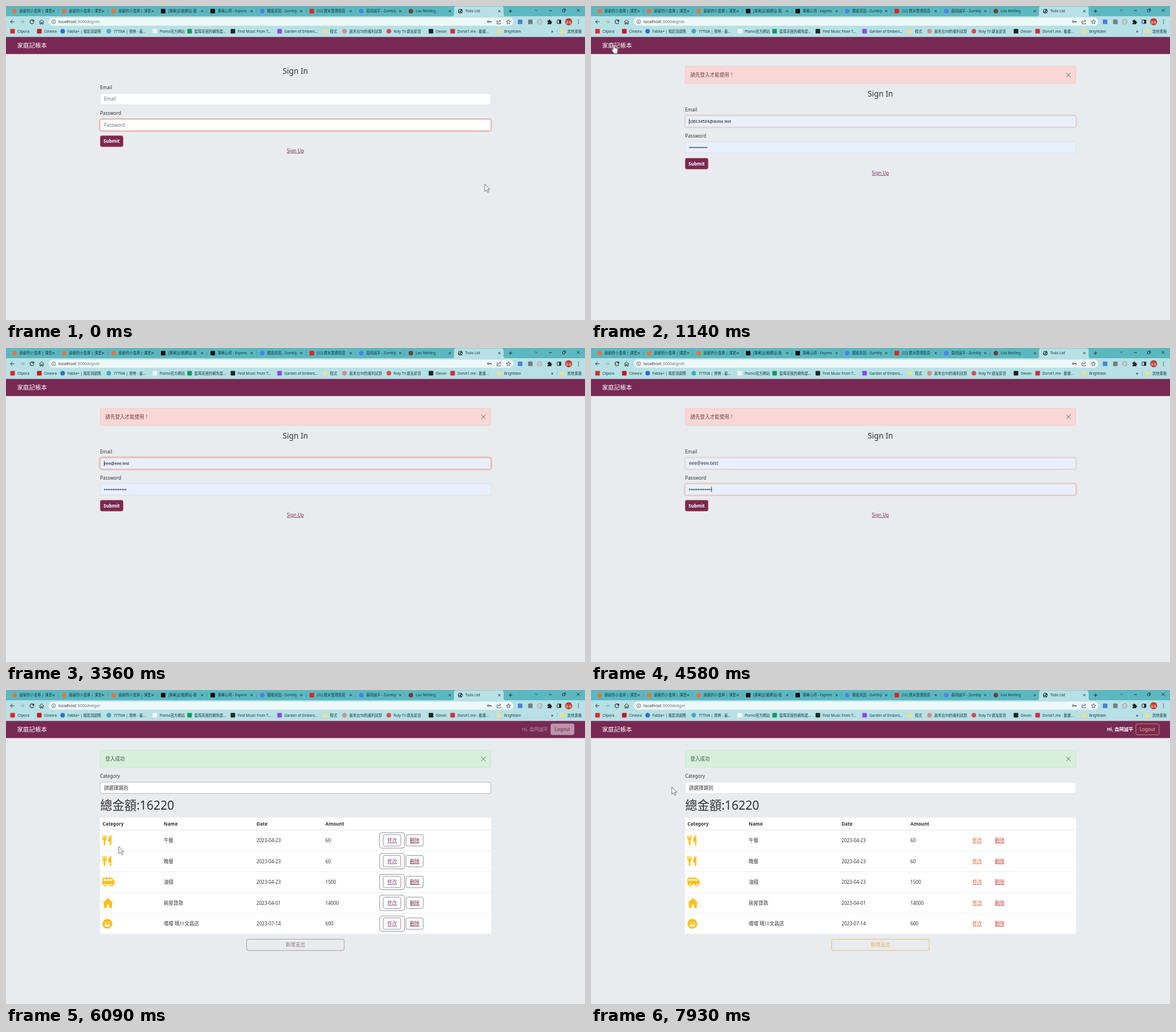
An HTML page for the animation above (8000 ms loop, 1017x551 px).

```html
<!DOCTYPE html>
<html lang="zh-Hant">
<head>
<meta charset="utf-8">
<title>Todo List</title>
<style>
html, body { margin: 0; width: 100%; height: 100%; overflow: hidden; background: #e9ecef; }
svg { display: block; width: 100vw; height: 100vh; }
text { font: 8.2px "Noto Sans", "Noto Sans CJK TC", "Noto Sans CJK JP", "Noto Sans CJK", sans-serif; fill: #333; white-space: pre; }
.ui { font-size: 6.3px; fill: #17393c; }
.url { font-size: 7.45px; }
.cjk { font-size: 8.55px; }
.brand { font-size: 10.5px; fill: #fff; }
.h3 { font-size: 13.65px; }
.h1 { font-size: 21.2px; }
.bold { font-weight: 700; }
.hint { fill: #6c757d; }
.auto { font: 7.1px "Liberation Sans", Arial, sans-serif; fill: #111; }
.mid { text-anchor: middle; }
.end { text-anchor: end; }
.link { text-decoration: underline; }
.line { fill: none; stroke: #222; stroke-width: .9; }
.dots { stroke: #222; stroke-linecap: round; }

.shift { animation: shift 8s step-end infinite; }
@keyframes shift { 0% { transform: none } 14.19%, 100% { transform: translateY(39.3px) } }

.glow-email { animation: glowEmail 8s linear infinite; }
@keyframes glowEmail {
  0%, 14.18% { opacity: 0 } 14.19%, 15.1% { opacity: .5 } 16.1%, 56.2% { opacity: 1 }
  57.2%, 58% { opacity: .35 } 59.2%, 100% { opacity: 0 }
}
.glow-pass { animation: glowPass 8s linear infinite; }
@keyframes glowPass {
  0%, 14.18% { opacity: 1 } 14.19%, 56.2% { opacity: 0 } 57.2%, 58% { opacity: .65 }
  59.2%, 71.3% { opacity: 1 } 73.2%, 100% { opacity: 0 }
}
.caret { animation: caret 8s step-end infinite; }
@keyframes caret {
  0% { transform: translate(172px, 158.5px); opacity: 0 }
  14.19% { transform: translate(172px, 158.5px); opacity: 1 }
  30% { transform: translate(261.3px, 158.5px) }
  32% { transform: translate(246.3px, 158.5px) }
  34% { transform: translate(172px, 158.5px) }
  37% { transform: translate(176.8px, 158.5px) }
  40% { transform: translate(181.4px, 158.5px) }
  42% { transform: translate(172px, 158.5px) }
  52.37% { transform: translate(224.3px, 158.5px) }
  56.2% { transform: translate(211.3px, 204px) }
  62.25% { transform: translate(175.2px, 204px) }
  64.37% { transform: translate(178.3px, 204px) }
  65.25% { transform: translate(181.4px, 204px); opacity: 1 }
  71.37%, 100% { transform: translate(181.4px, 204px); opacity: 0 }
}
.spin { transform-box: fill-box; transform-origin: 50% 50%; animation: spin 1s linear infinite; }
@keyframes spin { to { transform: rotate(360deg) } }

.cursor { animation: move 8s ease-in-out infinite; }
@keyframes move {
  0%, 1.37% { transform: translate(841px, 312.5px) }
  2.1%, 6.2% { transform: translate(842px, 337px) }
  12.6%, 19.1% { transform: translate(40.2px, 67.5px) }
  24.9% { transform: translate(451px, 228px) }
  27%, 66% { transform: translate(440px, 206px) }
  66.1%, 67.4% { transform: translate(205px, 274.5px) }
  69.25%, 77.2% { transform: translate(198px, 274.5px); animation-timing-function: ease-in }
  81.3% { transform: translate(370px, 262px); animation-timing-function: linear }
  87.5% { transform: translate(700px, 130px); animation-timing-function: ease-out }
  92.1%, 93% { transform: translate(891px, 70px); animation-timing-function: ease-in }
  96% { transform: translate(420px, 195px); animation-timing-function: ease-out }
  98% { transform: translate(124px, 228px) }
  99.1%, 100% { transform: translate(142px, 170px) }
}

/* Control colours settling after the ledger loads */
.box { animation: box 8s linear infinite; }
@keyframes box { 0%, 77.2% { stroke: #77757c } 78.2%, 100% { stroke: transparent } }
.edit { animation: edit 8s linear infinite; }
@keyframes edit { 0%, 77.2% { fill: #94617f } 78.2%, 100% { fill: #d97a52 } }
.del { animation: del 8s linear infinite; }
@keyframes del { 0%, 77.2% { fill: #6d3049 } 78.2%, 100% { fill: #c8443f } }
.add { animation: add 8s linear infinite; }
@keyframes add { 0%, 77.2% { fill: #8d7377 } 78.2%, 100% { fill: #e6b04a } }
.add-box { animation: addBox 8s linear infinite; }
@keyframes addBox { 0%, 77.2% { stroke: #a4827c } 78.2%, 100% { stroke: #e6b04a } }
.pick { animation: pick 8s linear infinite; }
@keyframes pick { 0%, 77.2% { stroke: #8f9194 } 78.2%, 100% { stroke: #d5d9de } }
.hi { animation: hi 8s linear infinite; }
@keyframes hi { 0%, 77.2% { fill: #a0708a } 78.2%, 100% { fill: #fff } }
.out-box { animation: outBox 8s linear infinite; }
@keyframes outBox {
  0%, 77.2% { fill: #bb94a9; stroke: #c3a0b0 } 78.2%, 100% { fill: #772953; stroke: #e5a560 }
}
.out { animation: out 8s linear infinite; }
@keyframes out { 0%, 77.2% { fill: #6a2d4e } 78.2%, 100% { fill: #f0c27c } }
</style>
</head>
<body>
<svg id="stage" viewBox="0 0 1017 551" preserveAspectRatio="none"></svg>
<script>
const LOAD = 1135, LEDGER = 6085, END = 8000;
const rules = [];

// Shows markup only between two times (ms) of the loop.
function on(from, to, markup) {
  const name = 'on' + rules.length, pc = ms => ms / END * 100 + '%';
  rules.push(`@keyframes ${name}{0%{opacity:0}${pc(from)}{opacity:1}${pc(to)}{opacity:0}100%{opacity:0}}`);
  return `<g style="animation:${name} 8s step-end infinite">${markup}</g>`;
}
const text = (x, y, s, cls = '') => `<text x="${x}" y="${y}" class="${cls}">${s}</text>`;
const rect = (x, y, w, h, fill, r = 0, more = '') =>
  `<rect x="${x}" y="${y}" width="${w}" height="${h}" rx="${r}" fill="${fill}" ${more}/>`;
const disc = (x, y, r, fill, more = '') => `<circle cx="${x}" cy="${y}" r="${r}" fill="${fill}" ${more}/>`;
const line = (d, more = '') => `<path class="line" d="${d}" ${more}/>`;
const shape = (d, fill, more = '') => `<path d="${d}" fill="${fill}" ${more}/>`;
const cross = (x, y, r, more) => line(`M${x - r} ${y - r}l${2 * r} ${2 * r}m0 ${-2 * r}l${-2 * r} ${2 * r}`, more);
const square = (x, y, c) => rect(x - 4, y - 4, 8, 8, c, 1);
const dot = (x, y, c) => disc(x, y, 4, c);
const folder = (x, y) => shape(`M${x - 3.5} ${y - 3.5}h3l1 1h3v6.3h-7z`, '#f9dc86');

function tabs() {
  const list = [
    ['爺爺的小金庫 | 課業', dot, '#f0713a'], ['爺爺的小金庫 | 課業', dot, '#f0713a'],
    ['爺爺的小金庫 | 課業', dot, '#f0713a'], ['[專案]記帳網站-我', square, '#111'],
    ['專案心得 - Expens', square, '#111'], ['腰痠原因 - Zumbly', dot, '#4b83ea'],
    ['(32) 週末整理廚房', square, '#e5241f'], ['森岡誠平 - Zumbly', dot, '#4b83ea'],
    ['Lou Meiting', dot, '#70403a'], ['Todo List']
  ];
  return list.map(([title, mark, color], i) => {
    const x = 4.5 + 87 * i;
    return (i < 9 ? mark(x + 10.6, 9, color) : '') +
      text(x + 19.2, 11.4, title, 'ui') + cross(x + 79, 9, 1.9) +
      (i < 8 ? rect(x + 87.2, 5, .6, 8, '#3c8d95') : '');
  }).join('');
}

function bookmarks() {
  return [
    [20, 'Clipora', square, '#e5241f'], [67, 'Cinevra', square, '#c9161d'],
    [108, 'Fablia+ | 電影與劇集', dot, '#2b6fd0'], [189, '77TIVA | 樂映 - 最...', dot, '#42a9c4'],
    [270, 'Plomo官方網站', square, '#f3f3f5'], [331, '藍莓茶館的轉角建...', square, '#159a5b'],
    [407, 'Find Music From T...', square, '#20282a'], [489, 'Garden of Embers...', square, '#8d4be0'],
    [569, '程式', folder], [603, '晨禾台50的複利試算', dot, '#d58c86'],
    [681, 'Roly TV 劇友影音', dot, '#e2483d'], [755, 'Devon', square, '#222'],
    [793, 'Dorvil1.me - 動畫...', square, '#d9283c'], [875, 'Brightden', folder], [986, '其他書籤', folder]
  ].map(([x, label, mark, color]) => mark(x - 8.5, 44.3, color) + text(x, 47, label, 'ui')).join('') +
    text(957.5, 47, '»', 'ui bold') + rect(968, 40, .6, 9, '#6fb3b8');
}

function globe(x, y) {
  return disc(x, y, 4, '#2c3638') +
    shape(`M${x - 3} ${y - 1}l2-2 2 .6-1 1.6-1.4.5.3 1.3 1.6.6-1 2zM${x + 1} ${y}l2-.8v2l-1.4 1z`, '#b9e2e6');
}

function toolbar() {
  return line('M14.8 27.7H8m3.2-3.3L7.9 27.7l3.3 3.3', 'stroke-width="1.1"') +
    line('M25.2 27.7H32m-3.2-3.3 3.3 3.3-3.3 3.3', 'style="stroke:#7fa3a7"') +
    line('M58.5 28 62.5 24l4 4M59.7 27.3v4.4h1.9v-2.6h1.8v2.6h1.9v-4.4') +
    rect(75, 20.3, 816, 14.2, '#eff8f9', 7.1) +
    disc(83.8, 27.6, 3.4, 'none', 'stroke="#444" stroke-width=".7"') + line('M83.8 27v2.4M83.8 25.6v.7') +
    disc(847, 27.5, 1.5, 'none', 'stroke="#333"') + line('M848.6 27.5h3.8v1.6m-1.5-1.6v1.3') +
    line('M864 26h-1.6v5.3h6V29.5M864.5 29.5q0-3.5 4-3.5m-1.8-2 2.1 2-2.1 2', 'style="stroke-width:.7"') +
    line('M882.5 23.9l1.1 2.5 2.7.3-2 1.8.6 2.7-2.4-1.4-2.4 1.4.6-2.7-2-1.8 2.7-.3z', 'style="stroke-width:.7"') +
    square(903, 27.7, '#4a82dc') + square(921, 27.7, '#777f82') +
    disc(937.5, 27.7, 3.9, '#eef6f7', 'stroke="#555" stroke-width=".7"') + line('M936.7 25.8q-1.4 1.9 0 3.8m1.7-3.8q1.4 1.9 0 3.8', 'style="stroke-width:.6"') +
    shape('M951 25.5h2q0-1.7 1.3-1.7t1.3 1.7h2v2q1.6 0 1.6 1.3t-1.6 1.3v1.8H951v-1.9q1.4 0 1.4-1.3t-1.4-1.3z', '#222') +
    rect(968, 24.5, 6.7, 6.3, 'none', .5, 'stroke="#222"') + rect(971.5, 24.5, 3.2, 6.3, '#222') +
    disc(988.3, 27.7, 6.2, '#c4372b') + text(988.3, 29.6, '安安', 'mid" style="font-size:5px;fill:#fff') +
    [-3, 0, 3].map(d => disc(1005.5, 27.7 + d, .8, '#222')).join('');
}

function reloadState() {
  const idle = line('M48.2 25.6a3.4 3.4 0 1 0 .7 3M48.9 24v2.6h-2.6', 'style="stroke-width:1.1"') + globe(798, 9);
  const busy = cross(45.5, 27.7, 2.8, 'style="stroke-width:1.1"') +
    '<g class="spin"><circle cx="798" cy="9" r="3.6" fill="none"/><path d="M798 5.4a3.6 3.6 0 0 0-3.4 2.5" fill="none" stroke="#7cb8c0" stroke-width=".8"/></g>';
  return on(0, 1060, idle) + on(1060, LOAD, busy) + on(LOAD, 5860, idle) + on(5860, LEDGER, busy) + on(LEDGER, END, idle);
}

function chrome() {
  return rect(0, 0, 1017, 18.5, '#5cb8c0') + rect(0, 18, 1017, 36.5, '#b7e1e5') +
    shape('M783 18.3q4 0 4-4V4.5q0-4 4-4h79q4 0 4 4v9.8q0 4 4 4z', '#b7e1e5') + tabs() +
    line('M883 9h6.4M886.2 5.8v6.4') + line('M929.2 6.2l2.5 2.4 2.5-2.4', 'style="stroke-width:.7"') +
    line('M953.5 8h5.5') + rect(977.5, 6.2, 4, 4, 'none', .5, 'class="line"') + line('M979 5h3.8v3.8', 'style="stroke-width:.7"') +
    cross(1005, 7.7, 2.5) + toolbar() + bookmarks() + reloadState() +
    text(92, 30.3, 'localhost<tspan fill="#6a7779">:3000/</tspan>', 'url') +
    on(0, LEDGER, text(143.5, 30.3, '<tspan fill="#6a7779">signin</tspan>', 'url end" style="text-anchor:start')) +
    on(LEDGER, END, text(143.5, 30.3, '<tspan fill="#6a7779">ledger</tspan>', 'url" style="text-anchor:start')) +
    rect(0, 54.3, 1017, 30, '#772953') + text(19.5, 73, '家庭記帳本', 'brand');
}

function alertBox(msg, bg, edge, ink) {
  return rect(165.3, 105.8, 686.4, 30, bg, 3, `stroke="${edge}" stroke-width=".6"`) +
    text(174.5, 124.1, `<tspan fill="${ink}">${msg}</tspan>`, 'cjk') + cross(838.5, 120.9, 3.7, 'style="stroke:#555"');
}
const field = (y, bg, more = 'stroke="#d5d9de"') => rect(165.3, y, 686.4, 19.8, bg, 3, `stroke-width=".6" ${more}`);
const glow = (y, cls) => `<g class="${cls}">` +
  rect(164.3, y - 1, 688.4, 21.8, 'none', 4, 'stroke="#e95420" stroke-opacity=".27" stroke-width="2.2"') +
  field(y, 'none', 'stroke="#f0a58c"') + '</g>';
const bullets = (n, gap, w, x = 173.4) =>
  `<path class="dots" d="M${x} 209.1h${(n - 1) * gap + .01}" stroke-width="${w}" stroke-dasharray="0 ${gap}" fill="none"/>`;

function signIn() {
  const mail = 'b36134534@dome.test', next = 'eee@eee.test';
  const value = (a, b, s, cls) => on(a, b, text(172, 166.2, s, cls));
  const emailText = value(0, LOAD, 'Email', 'hint') + value(LOAD, 2400, mail, 'auto') +
    value(2400, 2560, mail) + value(2560, 2720, mail.slice(0, -4)) + value(2720, 2960, 'Email', 'hint') +
    value(2960, 3200, 'e') + value(3200, 3360, 'ee') + value(3360, 4190, next, 'auto') + value(4190, LEDGER, next);
  const passText = on(0, LOAD, text(172, 212, 'Password', 'hint')) +
    on(LOAD, 2400, bullets(13, 2.5, 2)) + on(2400, 4980, bullets(13, 3.08, 2.3)) +
    on(4980, 5150, bullets(1, 3.08, 2.3)) + on(5150, 5220, bullets(2, 3.08, 2.3)) + on(5220, LEDGER, bullets(3, 3.08, 2.3));
  const blue = '#e8f0fe';
  return on(LOAD, LEDGER, alertBox('請先登入才能使用！', '#f9d7d5', '#efb9b6', '#6e3b38')) +
    '<g class="shift">' + text(508.3, 119.3, 'Sign In', 'h3 mid') +
    text(165.3, 145.8, 'Email') + text(165.3, 191.3, 'Password') +
    field(153.4, '#fff') + on(LOAD, 2960, field(153.4, blue)) + on(3360, LEDGER, field(153.4, blue)) +
    field(199, '#fff') + on(LOAD, 4980, field(199, blue)) +
    glow(153.4, 'glow-email') + glow(199, 'glow-pass') + emailText + passText +
    '<rect class="caret" width=".8" height="9.6" fill="#222"/>' +
    rect(165.4, 227.6, 40.4, 19.4, '#772953', 3, 'stroke="#e0683f" stroke-width=".7"') +
    text(185.6, 240.4, 'Submit', 'mid" style="fill:#fff;font-weight:600;font-size:8px') +
    text(508.3, 256.8, 'Sign Up', 'mid link" style="fill:#772953') + '</g>';
}

const gold = '#ffc01a';
const icons = {
  meal: shape('M0 0h1.5v4.5h1.3V0h2v4.5h1.3V0h1.5v5q0 2.6-2.3 3.6V17H2.4V8.600Q0 7.600 0 5zM15.800 0v17h-2.500v-6H10C10 5 11.600 0 15.800 0z', gold),
  van: shape('M2 .8h13.500l6 5.600v6.300H0V2.800q0-2 2-2z', gold) +
    rect(2.3, 3, 4, 3.6, '#fff', .5) + rect(8, 3, 4, 3.6, '#fff', .5) + shape('M13.700 3h1.200l3.600 3.600h-4.800z', '#fff') +
    [5, 16.3].map(x => disc(x, 13, 3.2, gold) + disc(x, 13, 1.4, '#fff')).join(''),
  home: shape('M9.700 0l9.700 8.800h-2.600v8.700h-5.100v-5.700H7.700v5.700H2.600V8.800H0z', gold),
  smile: disc(8.7, 8.7, 8.6, gold) + disc(5.8, 6.6, 1.2, '#fff') + disc(11.6, 6.6, 1.2, '#fff') +
    shape('M3.700 9.900h10q-.6 4.300-5 4.300t-5-4.300z', '#fff')
};

function row([icon, name, date, amount], i) {
  const y = 264 + 36.55 * i, b = y + 3;
  const frame = (x, top, w, h, r) => rect(x, top, w, h, 'none', r, 'class="box" stroke-width=".8"');
  return rect(165, y + 18, 687, .6, '#dee2e6') +
    `<g transform="translate(169.3 ${y - 8.7})">${icons[icon]}</g>` +
    text(277, b, name, 'cjk') + text(440, b, date) + text(561, b, amount) +
    frame(656.3, y - 13.6, 43.6, 27, 3.5) + frame(662.5, y - 10.2, 30.8, 20, 3) + frame(702.5, y - 10.2, 30.3, 20, 3) +
    text(678.2, b, '修改', 'cjk mid link edit') + text(717.8, b, '刪除', 'cjk mid link del');
}

function ledger() {
  const rows = [
    ['meal', '午餐', '2023-04-23', 60], ['meal', '晚餐', '2023-04-23', 60], ['van', '油錢', '2023-04-23', 1500],
    ['home', '房屋貸款', '2023-04-01', 14000], ['smile', '嚐嚐 晴川文昌店', '2023-07-14', 600]
  ];
  const head = [[169.5, 'Category'], [277, 'Name'], [440, 'Date'], [561, 'Amount']];
  return text(952.3, 72.2, 'Hi, 森岡誠平', 'end bold hi') +
    rect(957, 59.3, 40.8, 19.3, '#772953', 3, 'class="out-box" stroke-width=".8"') + text(977.4, 72.1, 'Logout', 'mid out') +
    alertBox('登入成功', '#d7f0db', '#b5dfbd', '#3a5f42') +
    text(165.3, 154.2, 'Category') + field(161.8, '#fff', 'class="pick"') + text(172, 174.8, '請選擇類別', 'cjk') +
    text(165.6, 210.2, '總金額:16220', 'h1') + rect(165, 224, 687, 204.5, '#fff') +
    head.map(([x, s]) => text(x, 238.1, s, 'bold')).join('') + rect(165, 245.4, 687, .7, '#d5d9dd') +
    rows.map(row).join('') +
    rect(422.7, 437.3, 171.4, 19.8, 'none', 3, 'class="add-box" stroke-width=".8"') + text(508.3, 450.3, '新增支出', 'cjk mid add');
}

function cursor() {
  const arrow = shape('M0 0v12.800l2.900-2.700 2.100 4.500 2-.9-2.100-4.400h4z', '#fff', 'stroke="#333" stroke-width=".7"');
  const hand = shape('M-1.200 8.500V1.400a1.200 1.200 0 0 1 2.400 0V6l4.500 1c1 .3 1.400 1 1.300 2l-.7 4-.8 2.900H.3L-3.700 10.500c-.6-1.200.6-2.200 1.500-1.400z', '#fff', 'stroke="#444" stroke-width=".6"');
  return '<g class="cursor">' + on(0, 960, arrow) + on(960, 1590, hand) + on(1590, 2150, arrow) +
    on(5390, LEDGER, hand) + on(LEDGER, END, arrow) + '</g>';
}

const scene = rect(0, 0, 1017, 551, '#e9ecef') + chrome() + on(0, LEDGER, signIn()) + on(LEDGER, END, ledger()) + cursor();
document.head.insertAdjacentHTML('beforeend', `<style>${rules.join('\n')}</style>`);
document.getElementById('stage').innerHTML = scene;
</script>
</body>
</html>
```
